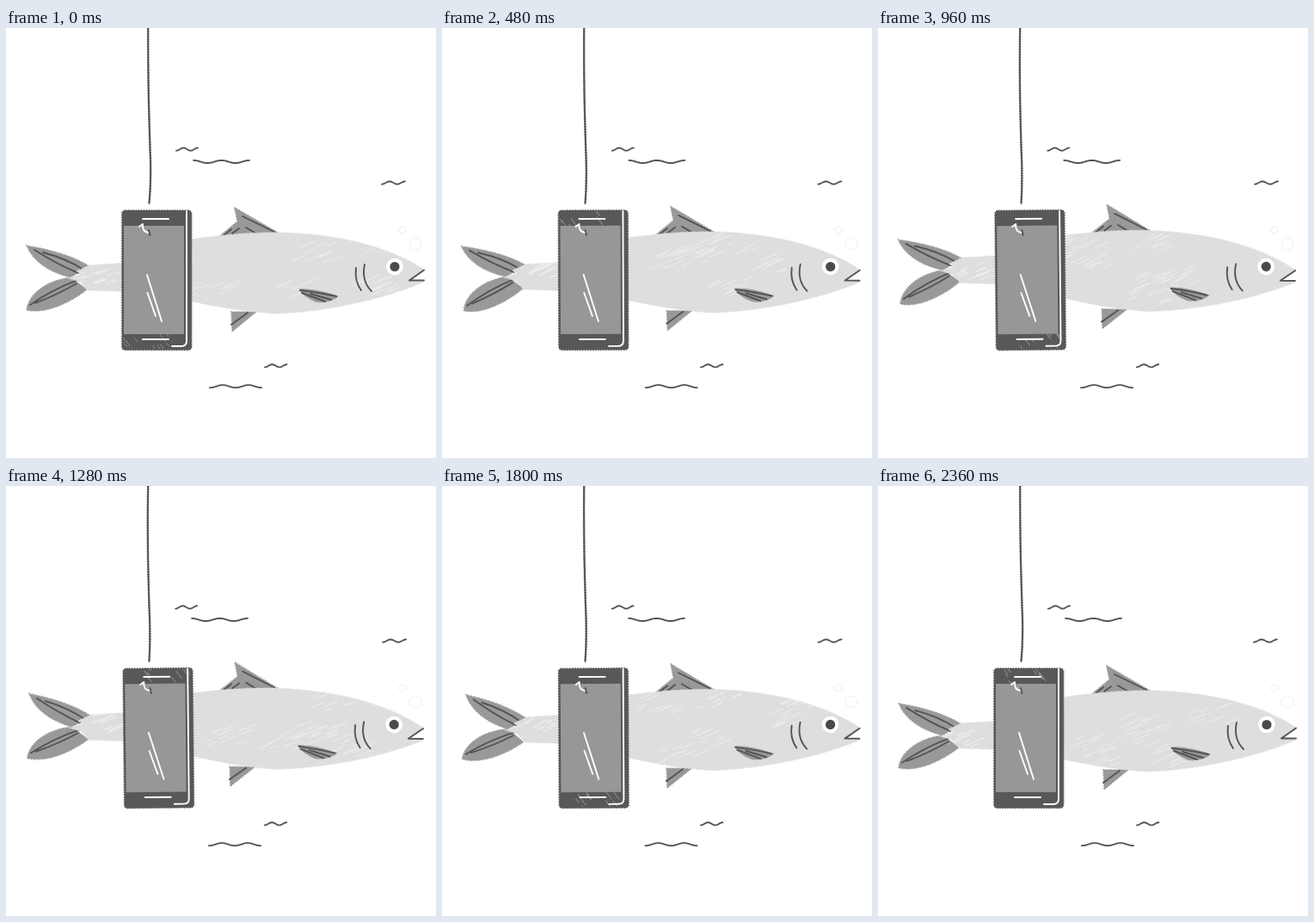
An HTML page for the animation above (2.4 s loop, 500 by 500 pixels).

```html
<!DOCTYPE html>
<html lang="en">
<head>
<meta charset="utf-8">
<title>Fish and phone</title>
<style>
html, body { margin: 0; width: 100%; height: 100%; overflow: hidden; background: #fff; }
svg { display: block; width: 100vw; height: 100vh; }
.line { fill: none; stroke-linecap: round; stroke-linejoin: round; }
.dark { stroke: #545454; stroke-width: 1.9; }
.white { stroke: #fff; stroke-width: 1.9; }
.fin { fill: #999; stroke: #999; }
.skin { fill: #dedede; stroke: #dedede; }
.rough { stroke-width: 1.4; stroke-dasharray: 1.5 1.5; }
.grain { fill: none; stroke: #545454; stroke-width: 2.5; stroke-dasharray: 1.5 1.5; }
.bubble { fill: none; stroke: #e6e6e6; stroke-dasharray: 2 1; }
</style>
</head>
<body>
<svg viewBox="0 0 500 500">
  <defs>
    <path id="skin" d="M170 255C205 246 265 237 320 238C400 240 455 260 487 281.5L469 294L486 295C450 311 385 329 315 332C265 329 230 321 170 308Z"/>
    <path id="root" d="M160 272L97 276L82 283L88 286L73 291L86 295L95 305L160 307Z"/>
    <clipPath id="skinClip"><use href="#skin"/></clipPath>
    <clipPath id="rootClip"><use href="#root"/></clipPath>
    <clipPath id="caseClip"><path d="M136 213H215V230H136ZM136 356H215V373H136ZM207 230H215V356H207Z"/></clipPath>
  </defs>

  <g id="waves"></g>
  <circle class="bubble" cx="461" cy="235" r="4"/>
  <circle class="bubble" cx="476" cy="251" r="6.8"/>

  <g id="tail">
    <path class="fin rough" d="M24 253C48 257 76 264 97 277L75 290C50 284 31 271 24 253Z"/>
    <path class="fin rough" d="M24 328C25 312 44 294 75 290L94 304C74 320 45 333 24 328Z"/>
    <path class="line dark" d="M33 258Q58 274 84 285M43 261Q70 268 90 281M28 322Q54 304 84 293M34 320Q62 309 82 297"/>
  </g>
  <g id="stem">
    <use href="#root" class="skin rough"/>
    <g id="rootMarks" class="line" clip-path="url(#rootClip)" stroke="#ededed" stroke-width="1.3"></g>
  </g>

  <g id="body">
    <path class="fin rough" d="M265.5 208.5L318 239L246 244L269 225Z"/>
    <path class="fin rough" d="M262 330L263 353L291 330Z"/>
    <path class="line dark" d="M275 219L312 237M279 232L291 239M252 242L262 234M263 239L271 233M262 345L281 331"/>
    <use href="#skin" class="skin rough"/>
    <g id="skinMarks" class="line" clip-path="url(#skinClip)" stroke="#eaeaea" stroke-width="1.2"></g>
    <path class="fin" d="M341 304C354 303 371 307 386 312C379 318 366 320 360 318Q347 313 341 304Z"/>
    <path class="line dark" d="M342 305Q362 307 384 312M344 308Q360 314 371 318M354 309L378 316"/>
    <path class="line dark" d="M407 279Q405 294 413 305M417 275Q413 294 425 306"/>
    <path class="line dark" d="M486 281.5L469 293.5H486"/>
    <circle cx="452" cy="277.5" r="9.8" fill="#fff"/>
    <circle cx="452" cy="277.5" r="5.6" fill="#4a4a4a"/>
  </g>

  <path id="cord" class="line dark"/>
  <path id="cordGrain" class="grain"/>

  <g id="phone">
    <rect class="rough" x="134.8" y="212" width="81" height="162.5" rx="4" fill="#585858" stroke="#585858"/>
    <rect x="137" y="230" width="70" height="126" fill="#979797"/>
    <g id="caseMarks" class="line" clip-path="url(#caseClip)" stroke="#8c8c8c"></g>
    <path class="line white" d="M210 213V364Q210 370 204 370H193M159 222H189M159 362H189"/>
    <path class="line white" d="M164 287L181 341M164.5 308L174 335"/>
    <path class="line white" d="M155 231L159 228Q158 237 166 238"/>
    <path class="line dark" d="M166 235L167.5 241"/>
  </g>
</svg>

<script>
const LOOP = 2400, STEP = 40, HOLD = 400;
const $ = id => document.getElementById(id);

function addPath(parent, d, className = '') {
  const el = document.createElementNS('http://www.w3.org/2000/svg', 'path');
  el.setAttribute('d', d);
  el.setAttribute('class', className);
  return parent.appendChild(el);
}

function randomFrom(seed) {
  return () => {
    seed = (seed * 16807) % 2147483647;
    return seed / 2147483647;
  };
}

// A ripple of half periods; sign 1 starts in a trough, -1 on a crest.
function wave(x, y, length, halves, sign, drift) {
  let d = '';
  for (let i = 0; i <= 30; i++) {
    const u = i / 30;
    d += (i ? 'L' : 'M') + (x + length * u) + ' ' + (y + 1.6 * sign * Math.cos(Math.PI * halves * u));
  }
  return { el: addPath($('waves'), d, 'line dark'), drift };
}
const waves = [
  wave(198, 141, 25, 3, 1, -0.8),
  wave(218, 155.5, 65, 4, -1, -2),
  wave(437, 180, 27, 3, 1, 1.2),
  wave(301, 392.8, 25.5, 3, 1, -0.3),
  wave(237, 416.7, 60, 4, 1, -1)
];

// Scattered clusters of parallel crayon strokes inside a box.
function crayon(parent, rnd, [x, y, w, h], clusters, strokes, dx, dy) {
  let d = '';
  for (let c = 0; c < clusters; c++) {
    const cx = x + rnd() * w, cy = y + rnd() * h;
    for (let i = 0; i < strokes; i++) {
      const size = 0.4 + rnd() * 0.8;
      const px = cx + (rnd() - 0.5) * dx * 3, py = cy + (rnd() - 0.5) * Math.abs(dy) * 3;
      d += `M${px} ${py}l${dx * size} ${dy * size}`;
    }
  }
  return addPath(parent, d);
}

const drawings = Array.from({ length: LOOP / HOLD }, (_, i) => {
  const rnd = randomFrom(4271 + i * 90017);
  return [
    crayon($('skinMarks'), rnd, [225, 248, 210, 70], 6, 10, 16, -7),
    crayon($('rootMarks'), rnd, [82, 280, 40, 18], 2, 8, 12, -5),
    crayon($('caseMarks'), rnd, [140, i % 2 ? 212 : 358, 66, 10], 2, 6, 6, 8)
  ];
});

const angle = t => 2 * Math.PI * t / LOOP;
const swing = t => (1 - Math.cos(angle(t))) / 2;
const ease = u => u * u * (3 - 2 * u);

function pose(id, transform) {
  $(id).setAttribute('transform', transform);
}

function draw(t) {
  const s = swing(t);
  // The tail follows the body with a delay.
  const shift = `translate(${2.2 * swing(t - 300) ** 2} ${-9.8 * ease(swing(t - 120))})`;
  const turn = 0.8 * s - 3 * Math.sin(angle(t)) + 0.9 * Math.sin(2 * angle(t));

  pose('body', `translate(${-0.9 * s} ${0.6 * s}) rotate(${1.1 * s} 487 281)`);
  pose('stem', shift);
  pose('tail', `${shift} rotate(${turn} 80 290)`);
  pose('phone', `rotate(${-0.6 * s} 165 100)`);
  for (const w of waves) w.el.setAttribute('transform', `translate(${w.drift * s} 0)`);

  const cord = `M165.2 0C${165 - s} 70 ${166.5 - s} 105 ${167.5 - s} 140Q${169.2 - s} 175 166.5 204`;
  $('cord').setAttribute('d', cord);
  $('cordGrain').setAttribute('d', cord);

  const shown = Math.floor(t / HOLD);
  drawings.forEach((set, i) => set.forEach(el => el.style.display = i === shown ? '' : 'none'));
}

const start = performance.now();
function tick() {
  const t = Math.max(0, performance.now() - start) % LOOP;
  draw(Math.floor(t / STEP) * STEP);
  requestAnimationFrame(tick);
}
tick();
</script>
</body>
</html>
```
